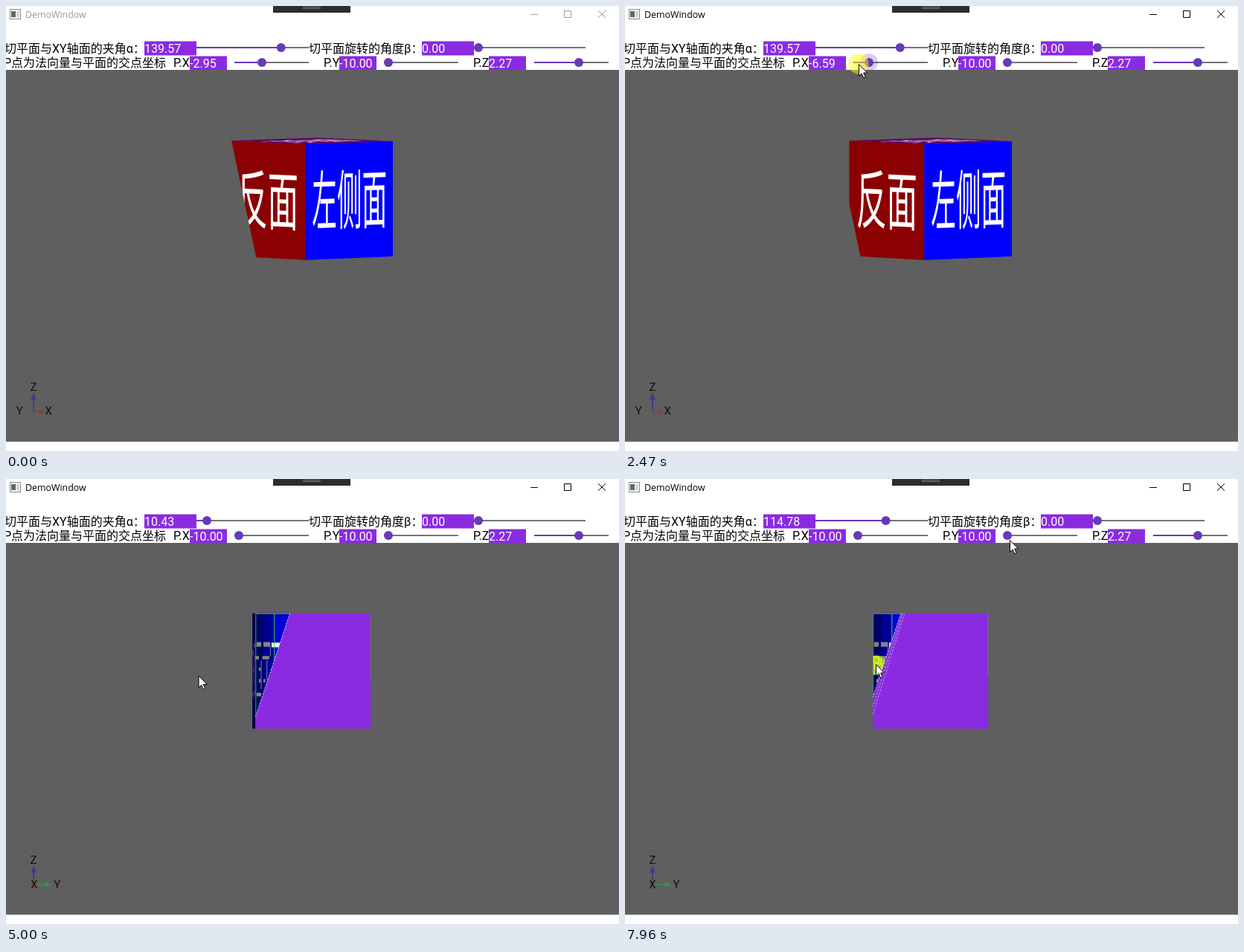
Animation, 824 px wide and 599 px high, one loop 8000 ms. Source, as an HTML page:

```html
<!DOCTYPE html>
<html lang="zh-CN">
<head>
<meta charset="utf-8">
<title>DemoWindow</title>
<style>
html, body { margin: 0; width: 100%; height: 100%; overflow: hidden; background: #fff; }
svg { display: block; width: 824px; height: 599px; }
text { font-family: Roboto, "Noto Sans CJK SC", "Noto Sans CJK", sans-serif; font-size: 16px; white-space: pre; }
#title { font-family: "Open Sans", "Noto Sans", sans-serif; font-size: 12.4px; }
.face { font-family: "Noto Sans CJK SC", "Noto Sans CJK", sans-serif; font-size: 56px; fill: #fff; text-anchor: middle; }
.axis { font-family: Roboto, sans-serif; font-size: 15px; fill: #111; text-anchor: middle; }
</style>
</head>
<body>
<svg viewBox="0 0 824 599" xmlns="http://www.w3.org/2000/svg">
  <defs>
    <clipPath id="cut"><polygon id="cutShape"/></clipPath>
    <clipPath id="hole"><polygon id="holeShape"/></clipPath>
    <path id="arrow" d="M.5.5V16.2L4.1 12.9 6.7 18.8 9.2 17.7 6.7 12H11.6Z" fill="#fff" stroke="#000"/>
  </defs>
  <rect width="824" height="599" fill="#fff"/>

  <g id="chrome">
    <rect x="5.5" y="4.5" width="14" height="13" fill="#f4f4f4" stroke="#8c8c8c"/>
    <rect x="7" y="7" width="6" height="8" fill="#5d6b66"/>
    <rect x="14.5" y="7" width="3" height="8" fill="#c9cfcc"/>
    <text id="title" x="26" y="16">DemoWindow</text>
    <path id="buttons" d="M705 11.5H715M750.5 6.5H759.5V15.5H750.5ZM796 6L806 16M806 6L796 16" fill="none"/>
    <rect x="359" width="104" height="9" fill="#2d2d2d"/>
    <path d="M399 1.5H423M399 3.5H423" stroke="#777"/>
  </g>

  <g id="labels">
    <text x="-2" y="63">切平面与XY轴面的夹角α：</text>
    <text x="407" y="63">切平面旋转的角度β：</text>
    <text x="-3" y="82">P点为法向量与平面的交点坐标</text>
    <text x="225" y="82">P.X</text><text x="427" y="82">P.Y</text><text x="628" y="82">P.Z</text>
  </g>
  <g id="sliders"></g>

  <rect y="86" width="824" height="500.5" fill="#5f5f5f"/>

  <g id="cube" clip-path="url(#cut)">
    <polygon id="topFill" fill="#5a0062"/>
    <g id="topArt"><text class="face" transform="translate(50 71) scale(.73 1)">顶面</text></g>
    <g id="red">
      <polygon fill="#8b0000"/>
      <g><text class="face" transform="translate(50 71) scale(.73 1)">反面</text></g>
    </g>
    <g id="blue">
      <polygon fill="#00f"/>
      <g><text class="face" transform="translate(50.5 70) scale(.51 1)">左侧面</text></g>
    </g>
    <g id="cap">
      <polygon fill="#8a2be2"/>
      <g>
        <g clip-path="url(#hole)">
          <rect width="8" height="100" fill="#000066"/>
          <rect x="7" width="9" height="100" fill="#000094"/>
          <rect x="16" width="20" height="100" fill="#0000d8"/>
          <path d="M1 25H5V29H1ZM7 25H13V29H7ZM0 37H3V40H0ZM6 37H12V40H6ZM1 69H5V72H1ZM3 47H4.5V50H3ZM3 57H4.5V60H3ZM7 57H8.5V60H7Z" fill="#858585"/>
          <rect x="14" y="25.5" width="9" height="4" fill="#fff"/>
          <path d="M5 41V66M10 41V58M13 29V37" stroke="#777a9c" stroke-width=".7"/>
          <path d="M.3 100V.4H40M16.5 0V45" fill="none" stroke="#32c84a" stroke-width=".7"/>
          <g id="stain">
            <circle cx="3" cy="45" r="8.5" fill="#9fda1c"/>
            <path d="M1 38H5V43H1ZM2 44H8V48H2ZM4 40H7V44" fill="none" stroke="#f4f43a" stroke-width=".8"/>
          </g>
        </g>
        <line id="edge" stroke="#c4c4e2" stroke-width=".6" stroke-dasharray="2 .8"/>
        <line id="trace1" x1="27.5" y1="0" x2="0" y2="88" stroke="#aaa2cc" stroke-width=".6" stroke-dasharray="2 1"/>
        <line id="trace2" x1="25.8" y1="0" x2="0" y2="81" stroke="#aaa2cc" stroke-width=".6" stroke-dasharray="2 1"/>
        <path d="M99.8 0V55" stroke="#77717f" stroke-width=".6"/>
      </g>
    </g>
  </g>

  <g id="gizmo">
    <path d="M37 546V528" stroke="#4a3a8c" stroke-width="2"/>
    <path d="M37 520L40.5 530H33.5Z" fill="#45348c"/>
    <g id="armX"></g><g id="armY"></g>
    <text class="axis" x="37" y="518">Z</text>
    <text class="axis" id="nameX">X</text>
    <text class="axis" id="nameY">Y</text>
  </g>

  <use id="leftover" href="#arrow" x="337" y="249"/>
  <circle id="press" r="13.5" fill="#ff0" fill-opacity=".5"/>
  <use id="cursor" href="#arrow"/>
</svg>
<script>
const LOOP = 8000, STEP = 77.2, PURPLE = '#673ab7';
const $ = id => document.getElementById(id);
const set = (el, attrs) => { for (const k in attrs) el.setAttribute(k, attrs[k]); };
const show = (el, on) => set(el, { visibility: on ? 'visible' : 'hidden' });
const pts = list => list.map(p => p.map(v => v.toFixed(2)).join()).join(' ');
const inside = (n, spans) => spans.some(([a, b]) => n >= a && n <= b);
const smooth = u => u * u * (3 - 2 * u);

// Rows are [step, value, ...]; returns the values at step n.
function track(rows, n, ease = u => u) {
  const i = rows.findIndex(r => r[0] > n);
  if (i < 0) return rows[rows.length - 1].slice(1);
  if (!i) return rows[0].slice(1);
  const a = rows[i - 1], b = rows[i];
  const u = ease((n - a[0]) / (b[0] - a[0]));
  return a.slice(1).map((v, k) => v + (b[k + 1] - v) * u);
}

const POINTER = [
  [1, 721, 512], [11, 342, 85], [12, 344, 80], [20, 390, 81], [22, 419, 88], [26, 435, 88],
  [28, 402, 78], [32, 314, 78], [34, 302, 80], [37, 345, 62], [38, 369, 57], [47, 270, 58],
  [48, 270, 58], [58, 453, 245], [59, 453, 245], [65, 243, 266], [70, 337, 250], [72, 337, 250],
  [81, 270, 58], [83, 292, 62], [85, 316, 66], [92, 348, 60], [97, 348, 60], [99, 351, 58],
  [100, 351, 58], [103, 517, 82]
];
const PX = [[12, -2.95], [20, 7.95], [21.5, 10], [28, 10], [32, -6.59], [33, -10]];
const ALPHA = [[38, 139.57], [47, 10.43], [81, 10.43], [85, 63.91], [92, 112], [97, 112], [99, 114.78]];
const TURN = [[58, 0], [64, -129.1], [65, -129.1], [70, -129.8], [71, -130.6]];
const HOLE = [[65, 30, 90], [71, 27, 85], [81, 27, 85], [85, 25, 75], [97, 25, 75], [99, 24.3, 73]];
const DRAG_PX = [[12, 22], [28, 34]];
const DRAG_ALPHA = [[38, 48], [81, 100]];
const PRESSED = [...DRAG_PX, ...DRAG_ALPHA, [70, 72]];

// Slider: number box, track and thumb.
function slider(boxX, boxW, y, x0, x1, low, high) {
  const g = document.createElementNS('http://www.w3.org/2000/svg', 'g');
  g.innerHTML = `<rect x="${boxX}" y="${y - 8.5}" width="${boxW}" height="19" fill="#8a2be2"/>
    <text x="${boxX}" y="${y + 6.5}" fill="#fff"></text>
    <path d="M${x0} ${y}H${x1}" stroke="#757575" stroke-width="2"/>
    <path stroke="${PURPLE}" stroke-width="2"/>
    <circle r="12" cy="${y}" fill="${PURPLE}" fill-opacity=".25"/>
    <circle r="6" cy="${y}" fill="${PURPLE}"/>`;
  $('sliders').append(g);
  const [, label, , done, halo, thumb] = g.children;
  return (value, held) => {
    const x = x0 + 6 + (value - low) / (high - low) * (x1 - x0 - 12);
    label.textContent = value.toFixed(2);
    set(done, { d: `M${x0} ${y}H${x > x0 + 7 ? x : x0}` });
    set(halo, { cx: x });
    set(thumb, { cx: x });
    show(halo, held);
  };
}
const setAlpha = slider(186, 70, 56, 256, 407, 0, 180);
const setBeta = slider(559, 70, 56, 629, 779, 0, 360);
const setPX = slider(247, 50, 76, 307, 407, -10, 10);
const setPY = slider(448, 50, 76, 508, 608, -10, 10);
const setPZ = slider(649, 50, 76, 710, 810, -10, 10);
setBeta(0, false);
setPY(-10, false);
setPZ(2.27, false);

// Maps the 100 x 100 face square onto three of its corners.
function warp(el, tl, tr, bl) {
  const m = [tr[0] - tl[0], tr[1] - tl[1], bl[0] - tl[0], bl[1] - tl[1]].map(v => v / 100);
  set(el, { transform: `matrix(${[...m, ...tl].map(v => v.toFixed(4)).join(' ')})` });
}

function drawCube(n, px, alpha) {
  const [turn] = track(TURN, n);
  const left = Math.max(0, 1 + turn / 129.1);
  const tops = [], bottoms = [];
  for (let i = 0; i < 4; i++) {
    const a = (-94.4 + 90 * i + turn) * Math.PI / 180;
    const x = 410.7 + 109.6 * Math.sin(a), depth = 109.6 * Math.cos(a);
    tops.push([x, 180.7 + left + depth * .04 * left]);
    bottoms.push([x, 336 + .7 * left + depth * .048 * left]);
  }
  set($('topFill'), { points: pts(tops) });
  show($('topArt'), left > 0.02);
  warp($('topArt'), tops[0], tops[3], tops[1]);

  ['red', 'blue', 'cap'].forEach((id, i) => {
    const g = $(id), [fill, art] = g.children;
    const tl = tops[i], tr = tops[i + 1], bl = bottoms[i], br = bottoms[i + 1];
    show(g, tr[0] - tl[0] > .3);
    const shape = [tl, tr, br, bl];
    if (id === 'blue') {
      const k = Math.min(1, Math.max(0, (40 - alpha) / 25)) * (n < 73 ? 1 : 0);
      const w = br[0] - bl[0];
      shape.splice(2, 1, [br[0], br[1] - 16 * k], [br[0] - .026 * w * k, br[1]]);
      const light = Math.min(1, .28 + 1.1 * Math.max(0, w / 155));
      set(fill, { fill: `rgb(0,0,${Math.round(255 * light)})` });
      set(art, { opacity: light });
    }
    set(fill, { points: pts(shape) });
    warp(art, tl, tr, bl);
  });

  const x = 303 + 5.41 * (px + 2.95), y = 181 + .05 * (x - 301);
  set($('cutShape'), { points: pts([[x + 30, y - 10], [x, y], [x + 34, y + 161], [600, 360], [600, 160]]) });

  const [w, h] = track(HOLE, n);
  set($('holeShape'), { points: pts([[0, 0], [w, 0], [0, h]]) });
  set($('edge'), { x1: w, y1: 0, x2: 0, y2: h });
  show2('stain', n >= 71);
  show2('trace1', n >= 83);
  show2('trace2', n >= 97);
  return turn;
}

// Display toggle, so hidden parents keep control of visibility.
function show2(id, on) { set($(id), { display: on ? 'inline' : 'none' }); }

function drawGizmo(turn) {
  const a = 133 * (1 + turn / 130.6) * Math.PI / 180;
  const arm = (id, side, depth, color) => {
    const reach = side * 32 * (1 + .2 * depth * (depth < 0));
    const tip = 37 + reach * .8, dir = Math.sign(reach);
    set($('name' + id), { x: 37 + reach, y: 550 + .7 * (depth >= -.1) });
    $('arm' + id).innerHTML = Math.abs(reach) < 4
      ? `<circle cx="37" cy="546" r="3" fill="${color}"/>`
      : `<path d="M37 546H${tip - 7 * dir}" stroke="${color}" stroke-width="1.5"/>
         <path d="M${tip} 546l${-9 * dir} -3v6Z" fill="${color}"/>`;
  };
  arm('X', Math.sin(a), Math.cos(a), '#8f3d3d');
  arm('Y', Math.cos(a), -Math.sin(a), '#3a9448');
  show($('armY'), Math.cos(a) > 0);
}

function draw(time) {
  const n = Math.floor((time % LOOP + 16) / STEP);
  const [px] = track(PX, n), [alpha] = track(ALPHA, n);
  const [x, y] = track(POINTER, n, smooth);
  const ink = n < 12 ? '#999' : '#000';
  set($('title'), { fill: ink });
  set($('buttons'), { stroke: ink });
  setPX(px, inside(n, DRAG_PX));
  setAlpha(alpha, inside(n, DRAG_ALPHA));
  drawGizmo(drawCube(n, px, alpha));
  set($('press'), { cx: x, cy: y });
  show($('press'), inside(n, PRESSED));
  set($('cursor'), { x, y });
  show($('cursor'), n > 0);
  show($('leftover'), n >= 73);
}

function loop() {
  draw(performance.now());
  requestAnimationFrame(loop);
}
loop();
</script>
</body>
</html>
```
